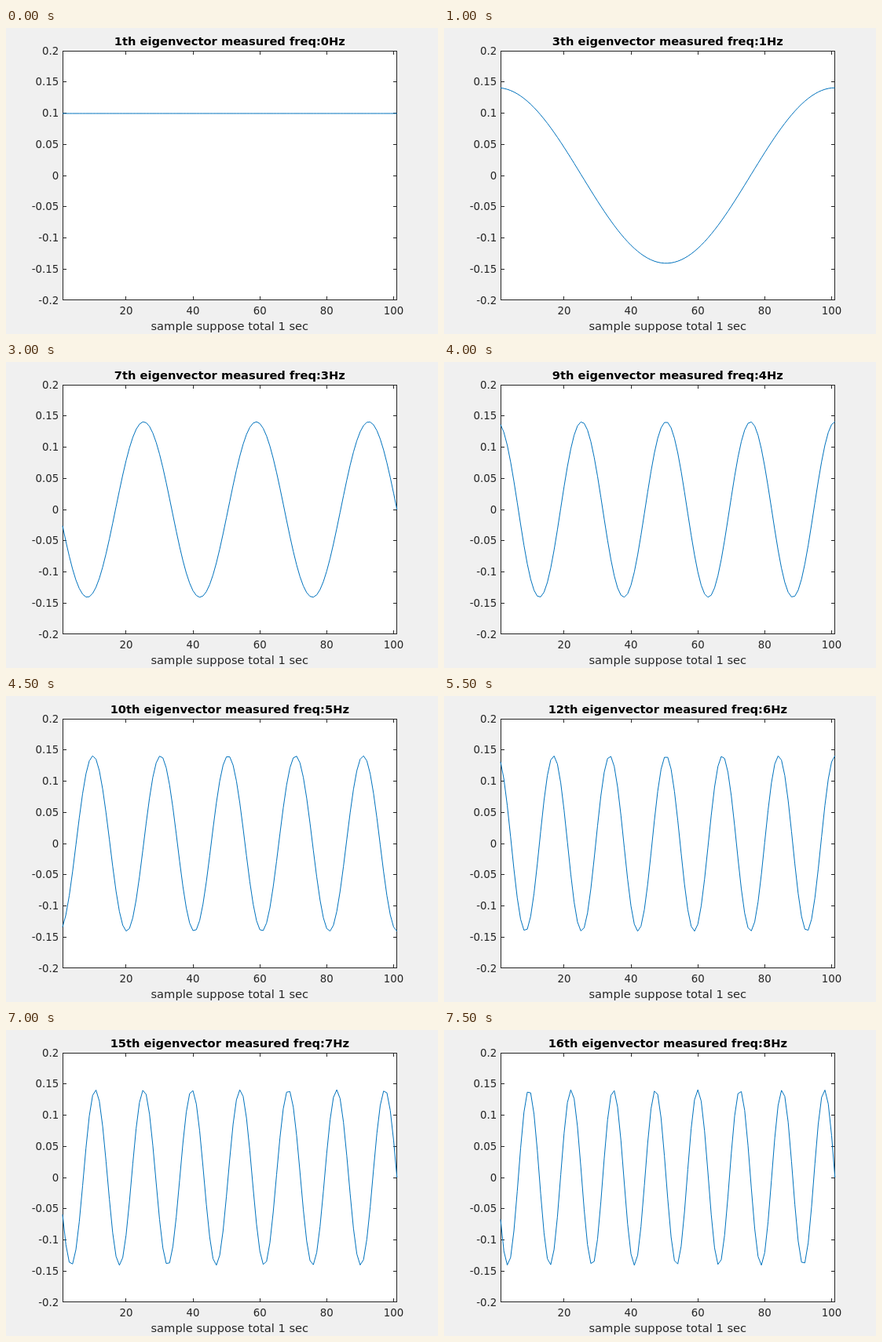
An HTML page for the animation above (8 s loop, 550 by 390 pixels).

```html
<!DOCTYPE html>
<html lang="en">
<head>
<meta charset="utf-8">
<title>Eigenvectors</title>
<style>
  html, body { margin: 0; width: 100%; height: 100%; overflow: hidden; background: #f0f0f0; }
  svg { display: block; }
  text { font: 13.333px "DejaVu Sans", sans-serif; fill: #262626; text-anchor: middle; }
  .y { text-anchor: end; }
  .label { font-size: 14.667px; }
  #title { font-size: 14.667px; font-weight: bold; fill: #000; }
  #axes { fill: none; stroke: #262626; shape-rendering: crispEdges; }
  #wave { fill: none; stroke: #0072bd; stroke-linejoin: round; }
</style>
</head>
<body>
<svg width="550" height="390" viewBox="0 0 550 390">
  <rect x="72" y="29" width="426" height="318" fill="#fff"/>
  <path id="axes"/>
  <g id="ticks"></g>
  <polyline id="wave"/>
  <text id="title" x="284.8" y="22"></text>
  <text class="label" x="284.8" y="385">sample suppose total 1 sec</text>
</svg>
<script>
const N = 101, STEP = 500, COUNT = 16, TICK = 4.6;
const $ = id => document.getElementById(id);
const px = n => 72 + (n - 1) * 4.2575;
const py = v => 188.02 - v * 794.6;
const snap = v => Math.floor(v) + 0.5;

// Modes come in sine/cosine pairs; these lists give the cosine members.
const cosines = [3, 5, 6, 9, 10, 12, 14];
const flipped = [10];

function sample(mode, n) {
  if (mode === 1) return Math.sqrt(1 / N);
  const angle = 2 * Math.PI * Math.floor(mode / 2) * n / N;
  const wave = cosines.includes(mode) ? Math.cos(angle) : -Math.sin(angle);
  return Math.sqrt(2 / N) * wave * (flipped.includes(mode) ? -1 : 1);
}

function drawAxes() {
  const left = snap(px(1)), right = snap(px(N));
  const top = snap(py(0.2)), bottom = snap(py(-0.2));
  let path = `M${left} ${top}H${right}V${bottom}H${left}Z`, labels = "";
  for (let n = 20; n <= 100; n += 20) {
    const x = snap(px(n));
    path += `M${x} ${bottom}v${-TICK}M${x} ${top}v${TICK}`;
    labels += `<text x="${px(n)}" y="365">${n}</text>`;
  }
  for (let i = -4; i <= 4; i++) {
    const y = py(i / 20);
    path += `M${left} ${snap(y)}h${TICK}M${right} ${snap(y)}h${-TICK}`;
    labels += `<text class="y" x="67.3" y="${Math.floor(y + 5.1)}">${i / 20}</text>`;
  }
  $("axes").setAttribute("d", path);
  $("ticks").innerHTML = labels;
}

let shown = 0;
function draw(now) {
  const mode = Math.floor(now / STEP) % COUNT + 1;
  if (mode !== shown) {
    shown = mode;
    const points = Array.from({ length: N }, (_, i) =>
      `${px(i + 1).toFixed(2)},${py(sample(mode, i + 1)).toFixed(2)}`);
    $("wave").setAttribute("points", points.join(" "));
    $("title").textContent =
      `${mode}th eigenvector measured freq:${Math.floor(mode / 2)}Hz`;
  }
}

function frame() {
  draw(performance.now() - start);
  requestAnimationFrame(frame);
}

drawAxes();
const start = performance.now();
frame();
</script>
</body>
</html>
```
